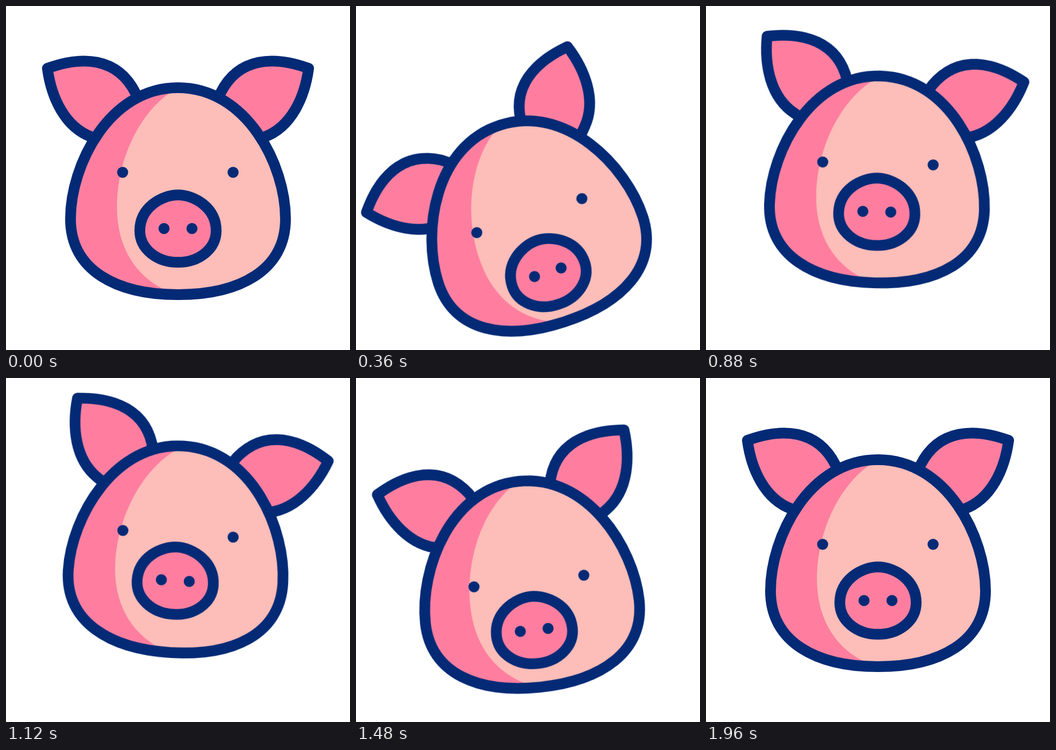
These frames come from a looping animation (640x640 px, 2 s). An HTML page:

```html
<!DOCTYPE html>
<html lang="en">
<head>
<meta charset="utf-8">
<title>Nodding pig</title>
<style>
  html, body { margin: 0; width: 100%; height: 100%; overflow: hidden; background: #fff; }
  svg { display: block; width: 100vw; height: 100vh; }

  .line { stroke: #042a76; stroke-width: 20; stroke-linejoin: round; }
  .pink { fill: #ff7e9f; }
  .skin { fill: #fdbdb8; }
  .dot { fill: #042a76; }

  /* Each part sets its three poses: dip, lift and second dip. */
  .part {
    --y1: 0px; --y2: 0px; --y3: 0px;
    --r1: 0deg; --r2: 0deg; --r3: 0deg;
    transform-box: view-box;
    transform-origin: 320px 320px;
    animation: nod 2s cubic-bezier(.3333, 0, .6667, 1) infinite;
  }
  .head {
    --y1: 72.6px; --y2: -36.3px; --y3: 40.6px;
    --r1: -21.2deg; --r2: 5deg; --r3: -6.2deg;
  }
  .ear { transform-origin: 250px 248px; }
  .ear.left { --r1: -38.5deg; --r2: 19.4deg; --r3: -10.8deg; }
  /* Mirrored, so its angles have the opposite sign. */
  .ear.right { --r1: 32deg; --r2: -19.2deg; --r3: 14.8deg; }
  .eyes { --y1: 23px; --y2: 2.5px; --y3: 29.4px; }
  .snout { --y1: 30.4px; --y2: -15.6px; --y3: 16.4px; }

  @keyframes nod {
    0%, 98%, 100% { transform: translateY(0) rotate(0deg); }
    24% { transform: translateY(var(--y1)) rotate(var(--r1)); }
    50% { transform: translateY(var(--y2)) rotate(var(--r2)); }
    76% { transform: translateY(var(--y3)) rotate(var(--r3)); }
  }
</style>
</head>
<body>
<svg viewBox="0 0 640 640">
  <defs>
    <path id="ear" class="pink line" d="M77 116C140 93 207 94 241 162L255 200L250 248L190 255L160 244C108 225 84 168 77 116Z"/>
    <path id="face" d="M320 152C448 152 520 296 520 396C520 492 434 537 320 537C206 537 120 492 120 396C120 296 192 152 320 152Z"/>
    <clipPath id="inside"><use href="#face"/></clipPath>
  </defs>

  <g class="part head">
    <g class="part ear left"><use href="#ear"/></g>
    <g transform="matrix(-1 0 0 1 640 0)">
      <g class="part ear right"><use href="#ear"/></g>
    </g>

    <use href="#face" class="skin"/>
    <path class="pink" clip-path="url(#inside)" d="M320 152L304 162C244 205 206.5 290 206.5 375C206.5 440 234 495 289 525L310 540H100V152Z"/>
    <use href="#face" class="line" fill="none"/>

    <g class="part eyes dot">
      <circle cx="217" cy="309.5" r="10.3"/>
      <circle cx="422.5" cy="309.5" r="10.3"/>
    </g>

    <g class="part snout">
      <path class="pink line" d="M320 351.5C350 351.5 391 375 391 418C391 452 359 476.8 320 476.8C281 476.8 249 452 249 418C249 375 290 351.5 320 351.5Z"/>
      <g class="dot">
        <circle cx="294" cy="414" r="10.3"/>
        <circle cx="346" cy="414" r="10.3"/>
      </g>
    </g>
  </g>
</svg>
</body>
</html>
```
